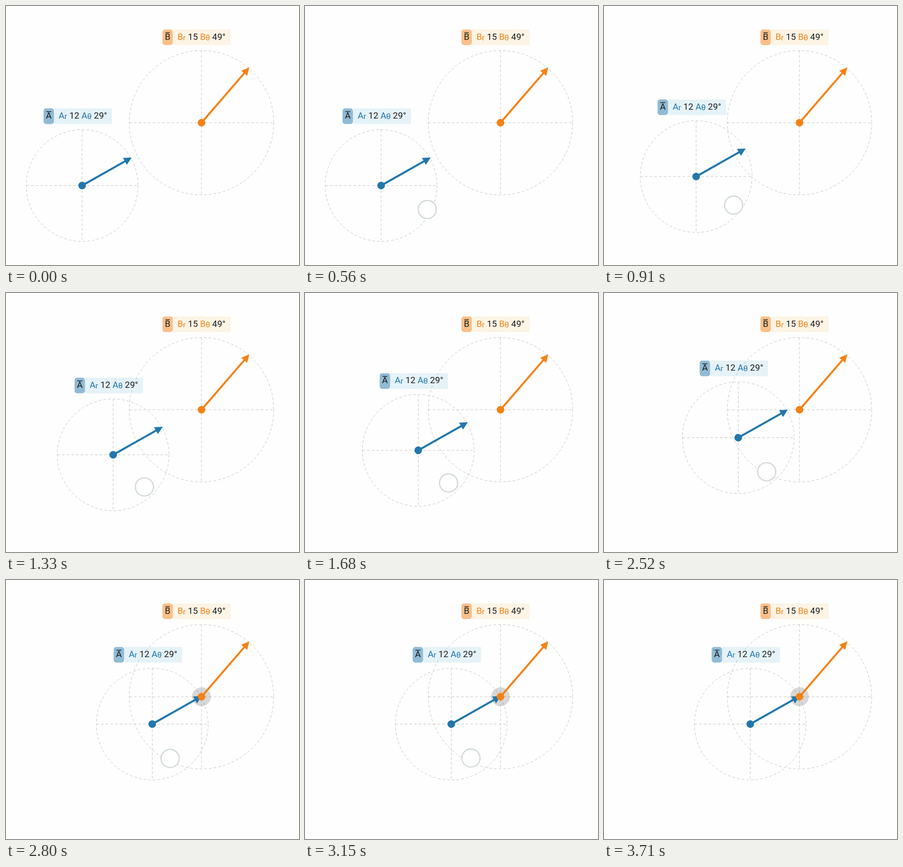
Animation of 562 by 497 pixels, one loop 3780 ms. Source, as an HTML page:

```html
<!DOCTYPE html>
<html lang="en">
<head>
<meta charset="utf-8">
<title>Polar vectors</title>
<style>
  html, body { margin: 0; width: 100%; height: 100%; overflow: hidden; background: #fefefe; }
  svg { display: block; }
  text { font: 17px Roboto, sans-serif; fill: #1c1c1c; white-space: pre; }
  .sub { font-size: 15px; }
  .guide { fill: none; stroke: #c6c6c6; stroke-width: 1; stroke-dasharray: 5 4; }
</style>
</head>
<body>
<svg id="stage" width="562" height="497" viewBox="0 0 562 497">
  <g id="guides"></g>
  <circle id="halo" cx="375" cy="224" r="18" fill="#000" fill-opacity=".15"/>
  <g id="vectors"></g>
  <circle id="pointer" r="17.4" fill="#fff" fill-opacity=".85" stroke="#d3dada" stroke-width="2.4"/>
</svg>
<script>
const LOOP = 3780, STEP = 70, SNAP = 2800;
const $ = id => document.getElementById(id);

// time, x, y
const dragPath = [
  [560, 146, 344.5], [630, 154, 340], [1190, 199.5, 314.5], [1330, 205.5, 310.5],
  [2030, 229, 293.3], [2520, 257.5, 277.7], [SNAP, 263, 276.5]
];
const pointerPath = [
  [560, 234.5, 390.5], [1330, 265.5, 372], [2030, 285.3, 357.3],
  [2520, 312, 343], [3150, 318.3, 341.7]
];
const snapped = [280.5, 276.5];

const clamp = v => Math.max(0, Math.min(1, v));

function along(path, t) {
  if (t <= path[0][0]) return path[0].slice(1);
  for (let i = 1; i < path.length; i++) {
    const [t0, x0, y0] = path[i - 1], [t1, x1, y1] = path[i];
    if (t <= t1) {
      const k = (t - t0) / (t1 - t0);
      return [x0 + (x1 - x0) * k, y0 + (y1 - y0) * k];
    }
  }
  return path[path.length - 1].slice(1);
}

function makeVector({ name, size, angle, radius, reach, color, tint, labelX, labelY, bar }) {
  const guide = `
    <circle class="guide" r="${radius}"/>
    <path class="guide" d="M${-radius} 0H${radius}M0 ${-radius}V${radius}"/>`;
  const body = `
    <g transform="translate(${labelX} ${labelY})">
      <rect x="20.5" width="110.5" height="30" fill="${tint}" fill-opacity=".11"/>
      <rect width="20" height="30" rx="5" fill="${color}" fill-opacity=".5"/>
      <text x="10" y="19.5" text-anchor="middle">${name}</text>
      <path d="M${10 - bar} 6.1H${10 + bar}" stroke="#1c1c1c" stroke-width="1.3"/>
      <text x="29" y="19.5"><tspan fill="${color}">${name}</tspan><tspan class="sub" fill="${color}" dy="1">r</tspan><tspan dy="-1"> ${size} </tspan><tspan fill="${color}">${name}</tspan><tspan class="sub" fill="${color}" dy="1">θ</tspan><tspan dy="-1"> ${Math.floor(angle)}°</tspan></text>
    </g>
    <g transform="rotate(${-angle})" fill="${color}">
      <path d="M0 0H${reach - 12}" stroke="${color}" stroke-width="3.8"/>
      <path d="M${reach} 0l-15 7.6v-15.2z"/>
      <circle r="7.3"/>
    </g>`;
  const parts = [["guides", guide], ["vectors", body]].map(([parent, markup]) => {
    const g = document.createElementNS("http://www.w3.org/2000/svg", "g");
    g.innerHTML = markup;
    $(parent).append(g);
    return g;
  });
  return (x, y) => parts.forEach(g => g.setAttribute("transform", `translate(${x} ${y})`));
}

const moveA = makeVector({
  name: "A", size: 12, angle: 29.5, radius: 107.2, reach: 109.3,
  color: "#2277ab", tint: "#2294bd", labelX: -74, labelY: -148, bar: 4.8
});
const moveB = makeVector({
  name: "B", size: 15, angle: 49.2, radius: 138.5, reach: 140.3,
  color: "#f58216", tint: "#f5a01c", labelX: -75, labelY: -179, bar: 4.3
});
moveB(375, 224);

function render(time) {
  const t = Math.floor(time % LOOP / STEP) * STEP;
  const held = t >= SNAP;
  moveA(...(held ? snapped : along(dragPath, t)));
  $("halo").setAttribute("visibility", held ? "visible" : "hidden");

  const [x, y] = along(pointerPath, t);
  const pointer = $("pointer");
  pointer.setAttribute("cx", x);
  pointer.setAttribute("cy", y);
  pointer.setAttribute("opacity", Math.min(clamp((t - 280) / 210), clamp((3500 - t) / 210)));
}

let start;
function tick(now) {
  start ??= now;
  render(now - start);
  requestAnimationFrame(tick);
}
render(0);
requestAnimationFrame(tick);
</script>
</body>
</html>
```
